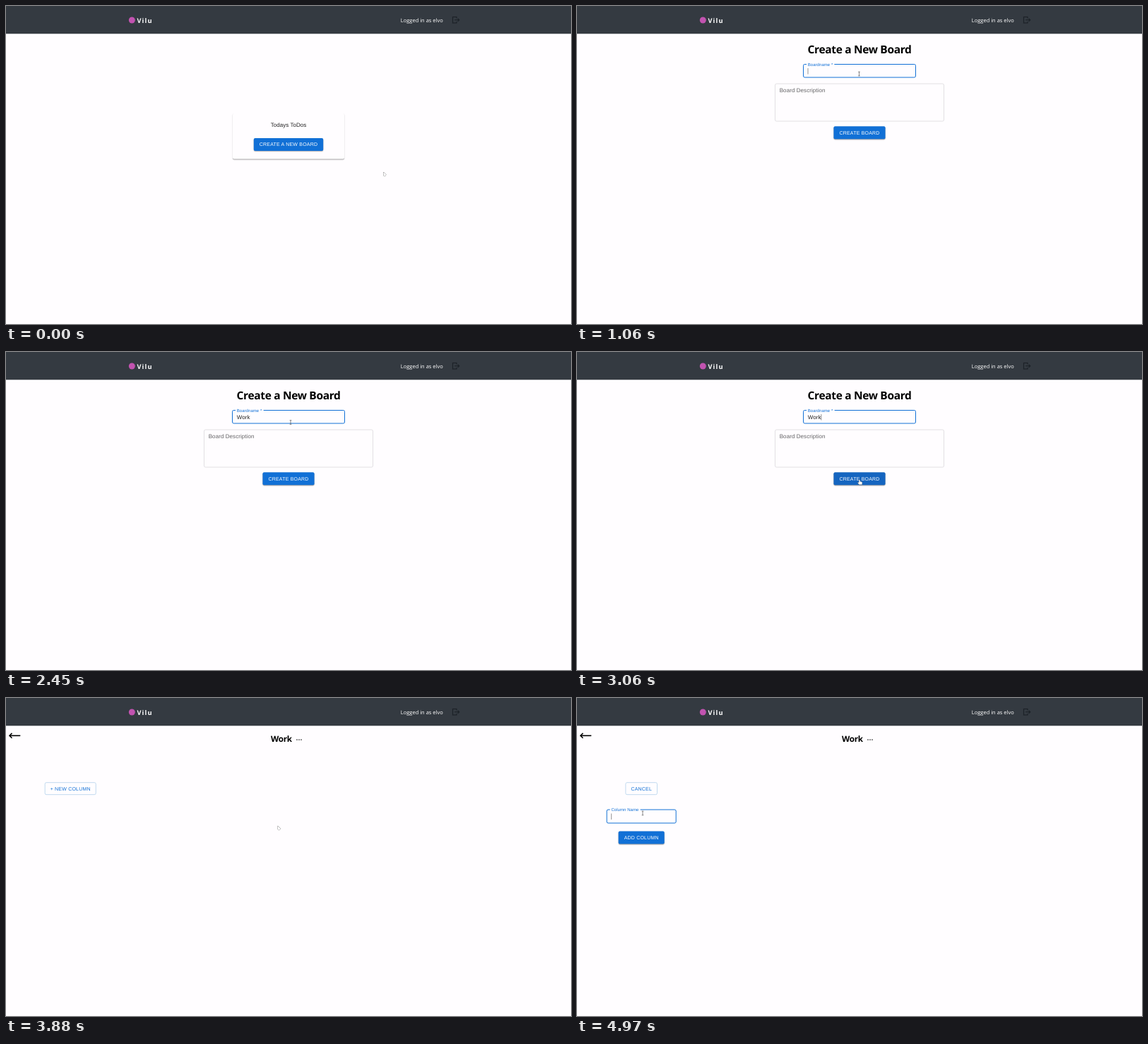
An HTML page with a canvas for the animation above (5000 ms loop, 800x450 px).

```html
<!DOCTYPE html>
<html lang="en">
<head>
<meta charset="utf-8">
<title>Board walkthrough</title>
<style>
  html, body { margin: 0; width: 100%; height: 100%; overflow: hidden; background: #fffdff; }
  canvas { display: block; }
</style>
</head>
<body>
<canvas id="stage" width="800" height="450"></canvas>
<script>
const ctx = document.getElementById('stage').getContext('2d');
const LOOP = 5000;
const BG = '#fffdff', BLUE = '#1170d6', INK = '#222', GREY = '#646466';
const UI = '"Liberation Sans", Arial, sans-serif';
const HUMAN = '"Open Sans", "Noto Sans", sans-serif';
const MID = 400, COLUMN = 91.2;

// Moments of the walkthrough, in ms
const OPEN_FORM = 390, FOCUS_NAME = 900, TYPE = 1150, KEY_GAP = 200, SAVE = 3080;
const REFRESH = 3270, OPEN_BOARD = 3850, NEW_COLUMN = 4390, FOCUS_COLUMN = 4720;

// Each pointer move eases from the last place to a new one
const HOME = { x: 534.5, y: 235 };
const MOVES = [
  { from: 30, to: 330, x: 440.5, y: 201 },
  { from: 580, to: 860, x: 399.5, y: 96 },
  { from: 1120, to: 2000, x: 403, y: 99.5 },
  { from: 2700, to: 2940, x: MID, y: 181 },
  { from: 3090, to: 3420, x: 390, y: 190 },
  { from: 3420, to: 3700, x: 390, y: 182 },
  { from: OPEN_BOARD, to: 4240, x: 112, y: 124.5 },
  { from: 4400, to: 4640, x: 93, y: 163 }
];

const progress = (t, from, to) => Math.min(1, Math.max(0, (t - from) / (to - from)));

function pointerAt(t) {
  let { x, y } = HOME;
  for (const move of MOVES) {
    const p = progress(t, move.from, move.to), e = p * p * (3 - 2 * p);
    x += (move.x - x) * e;
    y += (move.y - y) * e;
  }
  return { x, y, shape: 'arrow' };
}

const inside = (p, x, y, w, h) => p.x >= x && p.x <= x + w && p.y >= y && p.y <= y + h;

function setFont(size, gap = size * 0.0094, font = UI, weight = 400) {
  ctx.font = `${weight} ${size}px ${font}`;
  ctx.letterSpacing = gap + 'px';
  ctx.textRendering = 'geometricPrecision';
}

function text(str, x, y, size, { color = INK, font, weight, gap, align = 'left' } = {}) {
  setFont(size, gap, font, weight);
  ctx.textAlign = align;
  ctx.fillStyle = color;
  ctx.fillText(str, x, y);
}

function box(x, y, w, h, fill, stroke) {
  ctx.beginPath();
  ctx.roundRect(x, y, w, h, 2);
  if (fill) { ctx.fillStyle = fill; ctx.fill(); }
  if (stroke) { ctx.strokeStyle = stroke; ctx.lineWidth = 1; ctx.stroke(); }
}

function dot(x, y, r, color) {
  ctx.fillStyle = color;
  ctx.beginPath();
  ctx.arc(x, y, r, 0, 7);
  ctx.fill();
}

function line(points, color, width) {
  ctx.beginPath();
  points.forEach(([x, y]) => ctx.lineTo(x, y));
  ctx.strokeStyle = color;
  ctx.lineWidth = width;
  ctx.stroke();
}

// Horizontal arrow with its tip at x; the sign of length sets the direction
function arrow(x, y, length, head, color, width) {
  const back = x - Math.sign(length) * head;
  line([[x - length, y], [x, y]], color, width);
  line([[back, y - head], [x, y], [back, y + head]], color, width);
}

function raised(x, y, w, h, fill) {
  ctx.save();
  ctx.shadowColor = 'rgba(0,0,0,0.38)';
  ctx.shadowOffsetY = 0.9;
  ctx.shadowBlur = 1.2;
  box(x, y, w, h, fill);
  ctx.restore();
}

function button(label, mid, y, pointer, outlined) {
  const gap = 0.2;
  setFont(7, gap);
  const w = ctx.measureText(label).width + 16, x = mid - w / 2;
  const hover = inside(pointer, x, y, w, 18);
  if (hover) pointer.shape = 'hand';
  if (outlined) box(x + 0.5, y + 0.5, w - 1, 17, hover && '#f4f8fd', hover ? '#a9c3df' : '#c0d9ef');
  else raised(x, y, w, 18, hover ? '#1565c0' : BLUE);
  text(label, mid, y + 11.4, 7, { color: outlined ? BLUE : '#fff', gap, align: 'center' });
}

// Outlined input whose label floats into the border after focus
function field(label, mid, y, w, h, t, pointer, focus = Infinity, value = '', lastKey = focus) {
  const x = mid - w / 2, focused = t >= focus;
  const e = focused ? 1 - (1 - progress(t, focus, focus + 200)) ** 3 : 0;
  const hover = inside(pointer, x, y, w, h);
  if (hover) pointer.shape = 'beam';
  box(x + 0.5, y + 0.5, w - 1, h - 1, null, focused ? BLUE : hover ? '#77777a' : '#e2e0e3');
  const size = 8 - 2 * e;
  setFont(size);
  if (focused) {
    ctx.fillStyle = BG;
    ctx.fillRect(x + 5, y - 0.5, e * (ctx.measureText(label).width + 4), 2);
  }
  text(label, x + 6.7, y + 12.8 - 10.2 * e, size, { color: focused ? BLUE : GREY });
  if (!focused) return;
  text(value, x + 6.7, y + 12.8, 8);
  if (Math.floor((t - lastKey) / 500) % 2 === 0) {
    const caret = x + 7 + ctx.measureText(value).width;
    line([[caret, y + 6], [caret, y + 14.5]], '#666', 0.7);
  }
}

function header() {
  ctx.fillStyle = '#343a41';
  ctx.fillRect(0, 0, 800, 39.3);
  dot(178.3, 20, 4.5, '#c253b0');
  text('Vilu', 185.5, 23.8, 9.2, { color: '#fff', font: HUMAN, weight: 700, gap: 1.1 });
  text('Logged in as elvo', 558.8, 23.2, 7.5, { color: '#fff', font: HUMAN, gap: 0 });
  const dark = '#1d2228';
  ctx.strokeStyle = dark;
  ctx.lineWidth = 1.2;
  ctx.strokeRect(632.5, 15.5, 5.5, 8.5);
  ctx.fillStyle = '#343a41';
  ctx.fillRect(636.5, 17.5, 3, 4.5);
  arrow(641.7, 19.7, 6.5, 2.1, dark, 1.2);
}

function boardList(items, pointer) {
  const row = 21.5, h = 43 + row * items.length, top = 184.25 - h / 2;
  raised(321, top, 158, h, BG);
  items.forEach((name, i) => {
    const y = top + 5.2 + row * i;
    if (inside(pointer, 321, y, 158, row + 1.5)) {
      ctx.fillStyle = '#f3f2f4';
      ctx.fillRect(321, y, 158, row - 0.5);
      if (pointer.y < y + row) pointer.shape = 'hand';
    }
    text(name, MID, y + 13.6, 8, { gap: 0.05, align: 'center' });
  });
  button('CREATE A NEW BOARD', MID, top + h - 29.6, pointer);
}

function boardForm(t, pointer) {
  text('Create a New Board', MID, 67.3, 15.5,
    { color: '#000', font: HUMAN, weight: 700, gap: -0.33, align: 'center' });
  const last = Math.min(3, Math.floor((t - TYPE) / KEY_GAP));
  field('Boardname *', MID, 82, 160, 19.5, t, pointer, FOCUS_NAME,
    'Work'.slice(0, Math.max(0, last + 1)), last < 0 ? FOCUS_NAME : TYPE + last * KEY_GAP);
  field('Board Description', MID, 109.5, 240, 54, t, pointer);
  button('CREATE BOARD', MID, 170.3, pointer);
}

function boardPage(t, pointer) {
  arrow(5, 53.3, -15.3, 3.5, '#000', 1.6);
  text('Work', 375, 62.4, 11.7, { color: '#000', font: HUMAN, weight: 700, gap: -0.25 });
  for (let i = 0; i < 3; i++) dot(412 + 3 * i, 59, 0.85, INK);
  const open = t >= NEW_COLUMN;
  button(open ? 'CANCEL' : '+ NEW COLUMN', COLUMN, 119.2, pointer, true);
  if (!open) return;
  field('Column Name', COLUMN, 157.5, 99, 20, t, pointer, FOCUS_COLUMN);
  button('ADD COLUMN', COLUMN, 188.5, pointer);
}

const SHAPES = {
  arrow: new Path2D('M0 0V5L2 6 3.6 3.7Z'),
  hand: new Path2D('M-.7 0H.6V2.2L3.6 3V6.6H-.6L-2.6 3.8H-.7Z'),
  beam: new Path2D('M-1.3-2.8H1.3M0-2.8V2.8M-1.3 2.8H1.3')
};

function drawPointer({ x, y, shape }) {
  ctx.save();
  ctx.translate(x, y);
  ctx.strokeStyle = '#555';
  ctx.lineWidth = 0.7;
  ctx.fillStyle = '#fff';
  ctx.stroke(SHAPES[shape]);
  ctx.fill(SHAPES[shape]);
  ctx.restore();
}

function draw(t) {
  const pointer = pointerAt(t);
  ctx.fillStyle = BG;
  ctx.fillRect(0, 0, 800, 450);
  header();
  if (t >= OPEN_BOARD) boardPage(t, pointer);
  else if (t >= OPEN_FORM && t < SAVE) boardForm(t, pointer);
  else boardList(['Todays ToDos', 'Work'].slice(0, t < REFRESH ? 1 : 2), pointer);
  drawPointer(pointer);
}

const start = performance.now();
function tick() {
  draw((performance.now() - start) % LOOP);
  requestAnimationFrame(tick);
}
tick();
</script>
</body>
</html>
```
